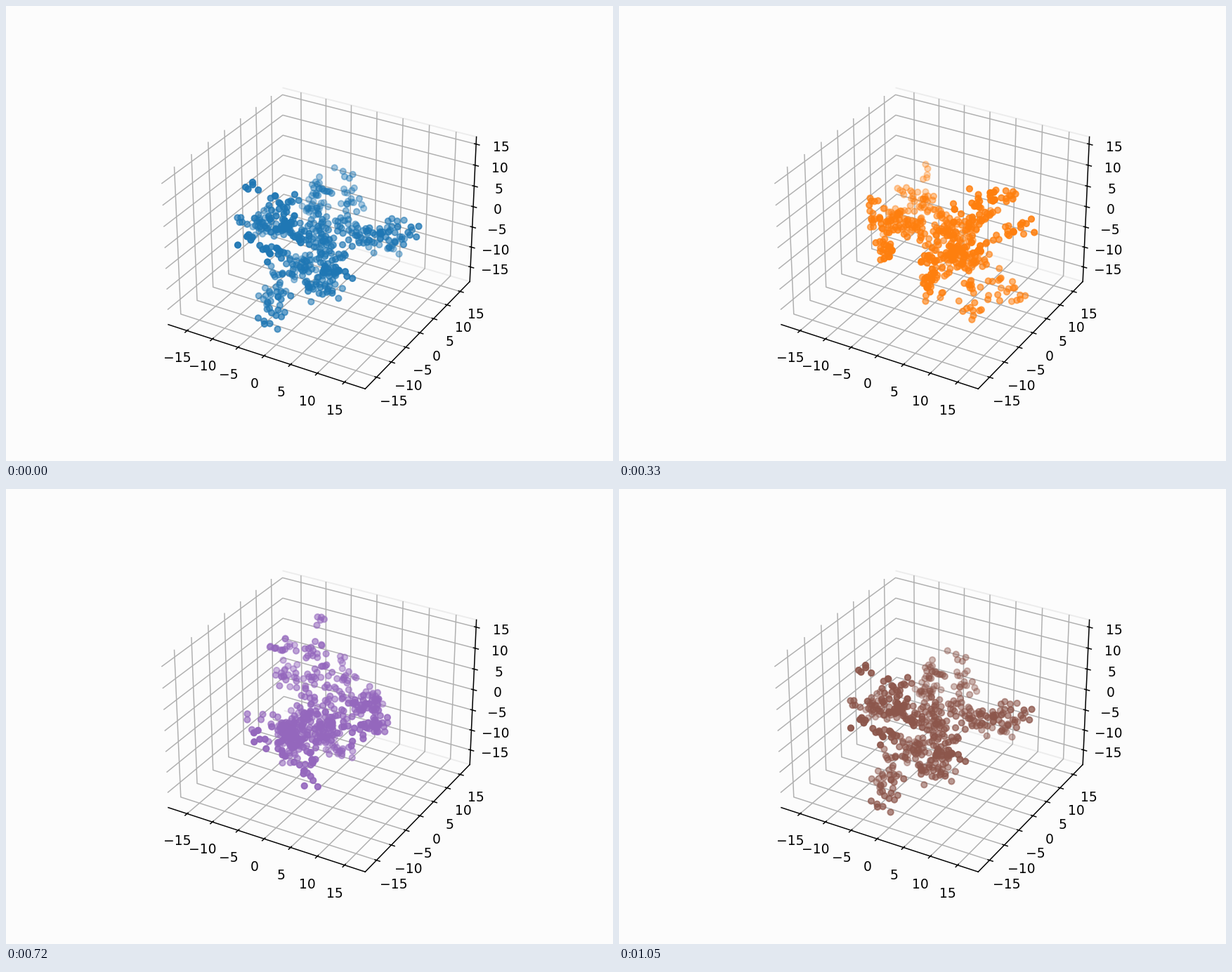
Animation, 864 px wide and 648 px high, one loop 1080 ms. Source, as a matplotlib script:

```python
import numpy as np
import matplotlib.pyplot as plt
from matplotlib.animation import FuncAnimation

FRAMES, INTERVAL = 36, 30
WIDTH, HEIGHT, DPI = 864, 648, 135
PAPER = "#fcfcfc"
SIDE = 18 * 25 / 24              # limits padded by 1/48 at each end
DEPTH = 17 * 25 / 24

# Ends of the arms that grow out of the middle of the cloud.
HUB = (0, 0, -1)
TIPS = np.array([
    (-3.4, -15.1, -15), (-8, -8.9, -16), (-5, 0.5, -13), (4.6, -5.1, -14),
    (5.2, -9.1, -11.5), (6.6, -5.4, -5), (9.3, 1.9, -2), (15.5, 5.2, 1),
    (9.9, 8.7, -7.4), (1.2, 9.9, 0), (-5.2, 8.6, 5), (-7.2, 9.9, -3),
    (-13.6, -1, -4), (-11.3, -8.4, 1), (-3.9, -15.2, 3), (1.9, -13.3, 9),
    (-4, -9.1, 12.5),
])


def make_cloud(clumps=6, size=5):
    """Scatter small clumps of points along each arm."""
    rng = np.random.default_rng(4)
    along = (np.arange(clumps) + rng.random((len(TIPS), clumps))) / clumps
    centers = HUB + along[..., None] ** 0.5 * (TIPS[:, None] - HUB)
    centers += rng.normal(0, 1.2, centers.shape)
    shape = (len(TIPS), clumps, size, 3)
    return (centers[:, :, None] + rng.normal(0, 0.9, shape)).reshape(-1, 3)


def turned(points, step):
    """Rotate points about the vertical axis; the last step closes the turn."""
    a = 2 * np.pi * step / (FRAMES - 1)
    x, y, z = points.T
    return x * np.cos(a) - y * np.sin(a), x * np.sin(a) + y * np.cos(a), z


fig = plt.figure(figsize=(WIDTH / DPI, HEIGHT / DPI), dpi=DPI, facecolor=PAPER)
ax = fig.add_subplot(projection="3d", facecolor=PAPER)
ax.set(xlim=(-SIDE, SIDE), ylim=(-SIDE, SIDE), zlim=(-1 - DEPTH, -1 + DEPTH))
for axis, edge in ((ax.xaxis, "none"), (ax.yaxis, "#ececec"), (ax.zaxis, "none")):
    axis.pane.set_fill(False)
    axis.pane.set_alpha(1)
    axis.pane.set_edgecolor(edge)
    axis.set_major_locator(plt.MultipleLocator(5))

cloud = make_cloud()


def update(i):
    for old in list(ax.collections):
        old.remove()
    return [ax.scatter(*turned(cloud, i), color=f"C{i % 10}")]


anim = FuncAnimation(fig, update, frames=FRAMES, interval=INTERVAL,
                     init_func=lambda: [], repeat=True)
plt.show()
```
